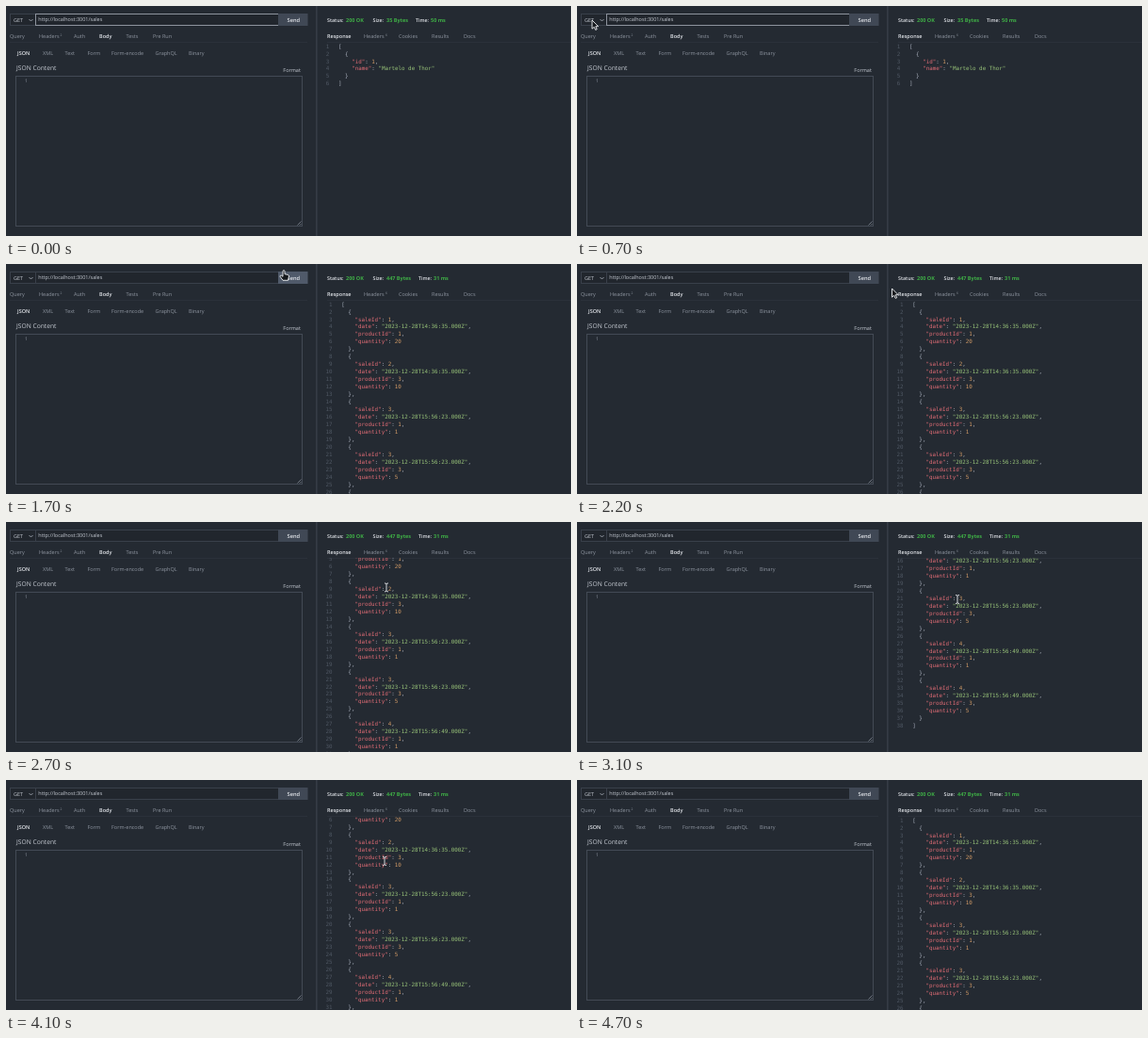
These frames come from a looping animation (600x244 px, 5500 ms). An HTML page:

```html
<!DOCTYPE html>
<html lang="en">
<head>
<meta charset="utf-8">
<title>API client</title>
<style>
  html, body { margin: 0; width: 100%; height: 100%; overflow: hidden; background: #242a32; }
  svg { display: block; width: 600px; height: 244px; }
  text { font: 5.5px "Open Sans", "Noto Sans", sans-serif; fill: #8f96a1; white-space: pre; text-rendering: geometricPrecision; }
  .code text { font: 5.86px "DejaVu Sans Mono", monospace; fill: #abb2bf; }
  .code .num { fill: #4f5763; text-anchor: end; }
  .key { fill: #e06c75; }
  .str { fill: #98c379; }
  .val { fill: #d19a66; }
  .on { fill: #e4e7ec; font-weight: 600; }
  .lit { fill: #c6cbd3; }
  .good { fill: #3fae46; font-weight: 700; }
  .cursor path { fill: #15181c; stroke: #f2f4f6; stroke-width: .9; stroke-linejoin: round; }
  .cursor .beam { fill: none; stroke: #e8eaee; }
</style>
</head>
<body>
<svg id="stage" viewBox="0 0 600 244">
  <defs><clipPath id="view"><rect x="331" y="38" width="269" height="206"/></clipPath></defs>
  <g fill="none" stroke="#39404a">
    <path d="M329.9 0V244" stroke="#414853"/>
    <path d="M4 38.5H320M341 38.5H600" stroke="#2b313a"/>
    <rect x="4.5" y="8.5" width="27" height="12" fill="#21262d"/>
    <rect id="field" x="31.5" y="8.5" width="258" height="12" fill="#21262d"/>
    <rect x="10.5" y="74.5" width="304" height="159" stroke="#434a55"/>
    <path d="M309.5 232.5L313.5 228.5M312 232.5L313.5 231" stroke="#8f96a1" stroke-width=".7"/>
    <path d="M24.5 14L26.5 16L28.5 14" stroke="#aeb4be" stroke-width=".8"/>
  </g>
  <rect id="send" x="289" y="8" width="31.5" height="13"/>
  <g id="labels"></g>
  <g id="before"></g>
  <g id="after"></g>
  <g class="cursor" id="cursor">
    <path id="arrow" d="M0 0V9.2L2.2 7.3L3.7 10.4L5.2 9.7L3.8 6.7H6.6Z"/>
    <path id="hand" d="M-1 .8Q0 -.6 1 .8V4.2L4.4 4.9Q5.6 5.2 5.4 6.6L4.6 10.8H-1L-4 6.7Q-4 5.3 -2.6 5.7L-1 6.8Z"/>
    <path id="beam" class="beam" d="M-2 -4.5Q0 -4.5 0 -3.4Q0 -4.5 2 -4.5M0 -3.4V3.4M-2 4.5Q0 4.5 0 3.4Q0 4.5 2 4.5"/>
  </g>
</svg>
<script>
const LOOP = 5500, STEP = 100, LINE = 7.96;
const $ = id => document.getElementById(id);

function add(parent, tag, attrs, content) {
  const el = document.createElementNS("http://www.w3.org/2000/svg", tag);
  for (const k in attrs) el.setAttribute(k, attrs[k]);
  if (content !== undefined) el.textContent = content;
  parent.appendChild(el);
  return el;
}

function label(parent, x, y, content, cls = "", size) {
  const el = add(parent, "text", { x, y, class: cls }, content);
  if (size) el.style.fontSize = size + "px";
}

// A row of tabs; the one named "active" is highlighted.
function tabs(y, active, items) {
  for (const [x, name] of items) label($("labels"), x, y, name, name === active ? "on" : "");
}

const ui = $("labels");
label(ui, 8, 17, "GET", "lit");
label(ui, 34.3, 16.2, "http://localhost:3001/sales", "lit");
label(ui, 298.5, 17, "Send", "on", 5.7);
tabs(33.8, "Body", [[4, "Query"], [35, "Headers"], [72, "Auth"], [99, "Body"], [127.5, "Tests"], [156, "Pre Run"]]);
tabs(51.9, "JSON", [[12, "JSON"], [39, "XML"], [62.5, "Text"], [86.5, "Form"], [112, "Form-encode"], [158.5, "GraphQL"], [194, "Binary"]]);
tabs(33.8, "Response", [[341, "Response"], [380, "Headers"], [417, "Cookies"], [452, "Results"], [486, "Docs"]]);
label(ui, 57.5, 31.8, "2", "", 3.4);
label(ui, 403, 31.8, "6", "", 3.4);
label(ui, 11, 68, "JSON Content", "lit", 6.7);
label(ui, 294.3, 70.2, "Format", "lit");
label(ui, 20, 80.8, "1", "", 5);

function status(group, parts) {
  for (const [x, name, valueX, value] of parts) {
    label(group, x, 17, name, "on", 5.3);
    label(group, valueX, 17, value, "good", 5.5);
  }
}

// Prints data as numbered, coloured JSON and returns the scrolling group.
function response(group, data, left) {
  const clip = add(group, "g", { "clip-path": "url(#view)" });
  const code = add(clip, "g", { class: "code" });
  JSON.stringify(data, null, 2).split("\n").forEach((line, i) => {
    const y = 44.6 + i * LINE;
    add(code, "text", { x: left - 9.8, y, class: "num" }, i + 1);
    const row = add(code, "text", { x: left, y });
    for (const [part] of line.matchAll(/"[^"]*"|\d+|[^"\d]+/g)) {
      const isKey = part[0] === '"' && line.includes(part + ":");
      const cls = isKey ? "key" : part[0] === '"' ? "str" : /\d/.test(part) ? "val" : "";
      add(row, "tspan", { class: cls }, part);
    }
  });
  return code;
}

status($("before"), [[341, "Status:", 361, "200 OK"], [389.5, "Size:", 404, "35 Bytes"], [435, "Time:", 451, "50 ms"]]);
response($("before"), [{ id: 1, name: "Martelo de Thor" }], 353);

const sales = [
  [1, "14:36:35", 1, 20], [2, "14:36:35", 3, 10], [3, "15:56:23", 1, 1],
  [3, "15:56:23", 3, 5], [4, "15:56:49", 1, 1], [4, "15:56:49", 3, 5]
].map(([saleId, time, productId, quantity]) =>
  ({ saleId, date: `2023-12-28T${time}.000Z`, productId, quantity }));
status($("after"), [[341, "Status:", 361, "200 OK"], [389.5, "Size:", 404, "447 Bytes"], [438, "Time:", 454, "31 ms"]]);
const list = response($("after"), sales, 356.3);

// Tracks: [time, ...values], linear in between.
const scroll = [[2400, 0], [2600, 20], [3000, 81], [3100, 121], [3500, 121], [3800, 101], [3900, 101],
  [4000, 61], [4100, 40.6], [4300, 10], [4400, 0]];
const path = [[100, 488, 158], [300, 330, 90], [500, 70, 22], [600, 13, 15], [700, 16, 15], [900, 300, 30],
  [1000, 488, 78], [1200, 330, 24], [1300, 295, 6.5], [1800, 295, 6.5], [1900, 298, 10], [2200, 334.5, 26],
  [2400, 404, 60], [3100, 404, 82], [3500, 402, 86], [4200, 402, 86], [4600, 400, 30]];

function at(track, t) {
  const i = track.findIndex(p => p[0] > t);
  if (i < 0) return track[track.length - 1].slice(1);
  if (i === 0) return track[0].slice(1);
  const a = track[i - 1], b = track[i], k = (t - a[0]) / (b[0] - a[0]);
  return a.slice(1).map((v, j) => v + (b[j + 1] - v) * k);
}

const show = (id, on) => $(id).style.display = on ? "" : "none";

function draw(t) {
  const loaded = t >= 1600;
  const hover = t >= 1300 && t < 2000;
  show("before", !loaded);
  show("after", loaded);
  list.setAttribute("transform", `translate(0 ${-at(scroll, t)[0]})`);
  $("field").setAttribute("stroke", t < 1400 ? "#8d939d" : "#39404a");
  $("send").setAttribute("fill", hover ? "#505a6a" : "#404855");

  const [x, y] = at(path, t);
  const beam = (t < 300 && x > 331) || (t >= 2400 && y > 38);
  show("cursor", t >= 100 && t < 4700);
  show("hand", hover);
  show("beam", beam);
  show("arrow", !hover && !beam);
  $("cursor").setAttribute("transform", `translate(${x} ${y})`);
}

const start = performance.now();
function tick() {
  let t = (performance.now() - start) % LOOP;
  t = Math.floor(t / STEP) * STEP;
  if (t > 3500 && t < 3800) t = 3500;
  draw(t);
  requestAnimationFrame(tick);
}
tick();
</script>
</body>
</html>
```
